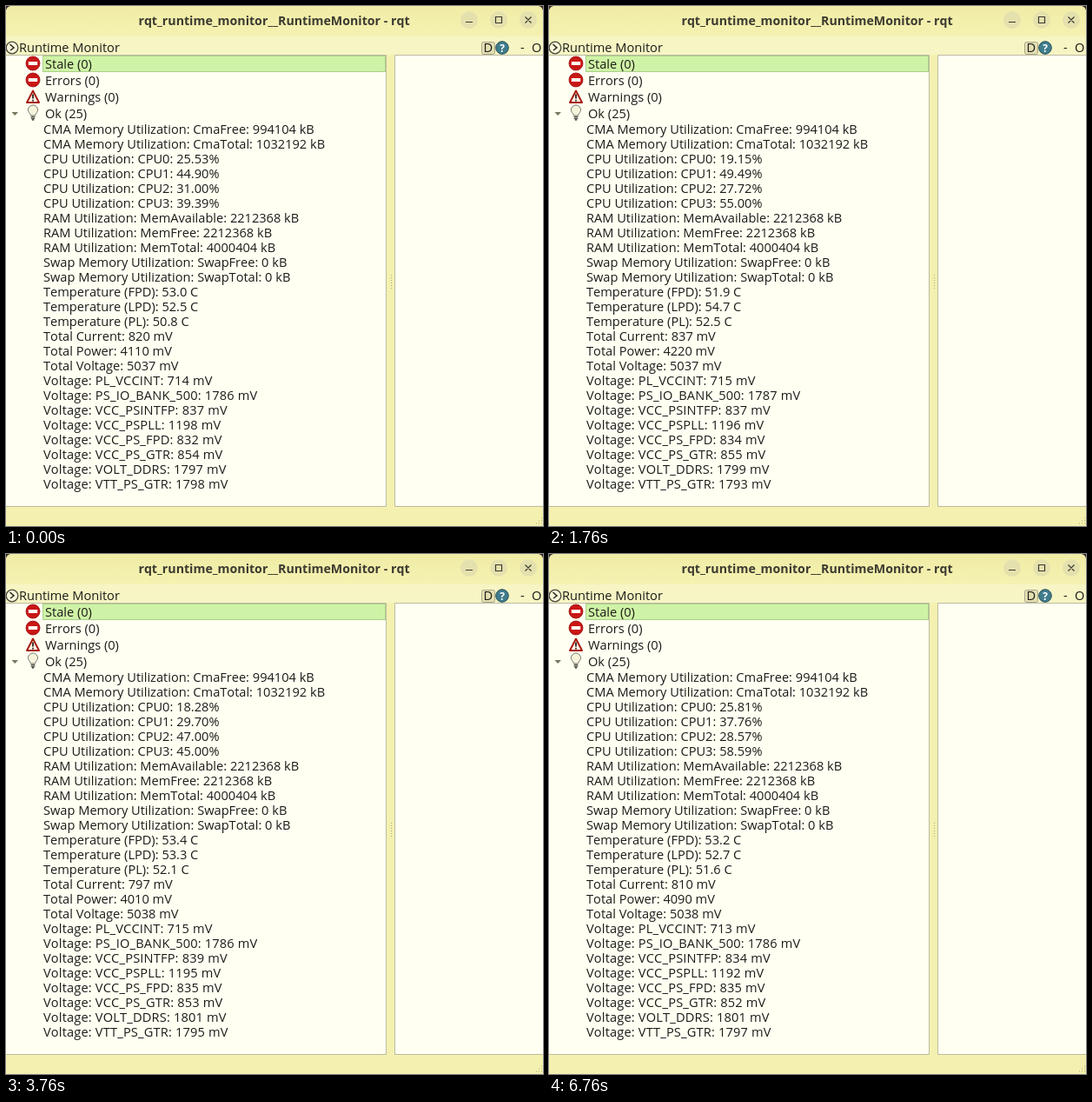
Animation of 618x598 px, one loop 8 s. Source, as an HTML page:

```html
<!DOCTYPE html>
<html lang="en">
<head>
<meta charset="utf-8">
<title>Runtime Monitor</title>
<style>
html, body { margin: 0; width: 618px; height: 598px; overflow: hidden; background: #f4f1b0; }
svg { display: block; }
text { font: 14.6px "Open Sans", "Noto Sans", sans-serif; font-kerning: none; fill: #1c1c18; white-space: pre; }
.title { font-weight: 700; font-size: 14.2px; fill: #3b3a30; text-anchor: middle; }
.volt { letter-spacing: .17px; }
</style>
</head>
<body>
<svg width="618" height="598" viewBox="0 0 618 598">
  <defs>
    <linearGradient id="bar" x1="0" y1="0" x2="0" y2="1">
      <stop offset="0" stop-color="#f0eca6"/>
      <stop offset="1" stop-color="#f5f2b2"/>
    </linearGradient>
    <g id="stop">
      <circle r="8" fill="#c91616" stroke="#9c0d0d" stroke-width=".8"/>
      <rect x="-5.2" y="-2" width="10.4" height="4" rx=".6" fill="#fffdf2"/>
    </g>
  </defs>

  <rect width="618" height="598" fill="#f4f1b0"/>
  <rect width="618" height="35" fill="url(#bar)"/>
  <rect y="35" width="618" height="21" fill="#f7f5c4"/>
  <path d="M0 0H5Q1 1 0 5ZM618 0H613Q617 1 618 5Z" fill="#3a2a2a"/>
  <text class="title" x="308.5" y="22">rqt_runtime_monitor__RuntimeMonitor - rqt</text>

  <g fill="#e5e1ae">
    <circle cx="533" cy="16" r="10"/>
    <circle cx="567" cy="16" r="10"/>
    <circle cx="601" cy="16" r="10"/>
  </g>
  <path d="M529 18.5H537M563.5 12.5H570.5V19.5H563.5ZM597.5 12.5L604.5 19.5M604.5 12.5L597.5 19.5" fill="none" stroke="#3b3a30" stroke-width="1.2"/>

  <circle cx="7" cy="48" r="6.8" fill="#fbf8dc" stroke="#4b4a3c" stroke-width="1.3"/>
  <path d="M4.5 44L9 48L5 51" fill="none" stroke="#26251c" stroke-width="1.5"/>
  <text x="15" y="53">Runtime Monitor</text>
  <rect x="547.5" y="41.5" width="15" height="14" rx="2" fill="#e3dfb2" stroke="#a9a68a"/>
  <text x="549.5" y="53">D</text>
  <circle cx="571" cy="48" r="7.3" fill="#3f7c8c" stroke="#28505c"/>
  <text x="571" y="52.5" text-anchor="middle" style="font-size:12px;font-weight:700;fill:#fff">?</text>
  <text x="592" y="53">-</text>
  <text x="605" y="53">O</text>

  <path d="M-.5 56.5H437.5V575.5H-.5ZM447.5 56.5H619V575.5H447.5Z" fill="#fffff2" stroke="#bcbba0"/>
  <path d="M443.5 309V326" stroke="#a9a78a" stroke-dasharray="1 2"/>
  <rect x="42.5" y="57.5" width="394" height="18" fill="#cff3a6" stroke="#a9cf8c"/>

  <use href="#stop" x="31" y="66"/>
  <use href="#stop" x="31" y="85"/>
  <path d="M31 97.5L38 111H24Z" fill="#fffbe8" stroke="#a81c14" stroke-width="2" stroke-linejoin="round"/>
  <path d="M31 101.5V106.5M31 107.8V109.6" stroke="#221512" stroke-width="1.7"/>
  <path d="M6.5 122H14L10.2 126Z" fill="#77765f"/>
  <path d="M28.5 126Q28 124 26.5 122.5A5.4 5.4 0 1 1 35.5 122.5Q34 124 33.5 126Z" fill="#f6f5dc" stroke="#77766a"/>
  <path d="M28.6 127.5H33.4M28.8 129.5H33.2M30 131H32" stroke="#55544c" stroke-width="1.3"/>

  <g id="rows"></g>
  <path d="M616 589h1M613 592h1m2 0h1M610 595h1m2 0h1m2 0h1" stroke="#a9a67c" stroke-width="1.2"/>
</svg>
<script>
const LOOP = 8000;
const rows = document.getElementById('rows');

// Each reading: start time, then the values of the changing rows from top to bottom.
const readings = [
  [0, 25.53, 44.90, 31.00, 39.39, 53.0, 52.5, 50.8, 820, 4110, 5037, 714, 1786, 837, 1198, 832, 854, 1797, 1798],
  [1360, 19.15, 49.49, 27.72, 55.00, 51.9, 54.7, 52.5, 837, 4220, 5037, 715, 1787, 837, 1196, 834, 855, 1799, 1793],
  [3040, 18.28, 29.70, 47.00, 45.00, 53.4, 53.3, 52.1, 797, 4010, 5038, 715, 1786, 839, 1195, 835, 853, 1801, 1795],
  [4840, 22.34, 28.28, 53.47, 39.60, 53.2, 52.8, 52.4, 812, 4090, 5037, 712, 1786, 839, 1197, 836, 853, 1797, 1798],
  [6760, 25.81, 37.76, 28.57, 58.59, 53.2, 52.7, 51.6, 810, 4090, 5038, 713, 1786, 834, 1192, 835, 852, 1801, 1797]
];

const percent = v => v.toFixed(2) + '%';
const celsius = v => v.toFixed(1) + ' C';
const milli = v => v + ' mV';

function addText(x, y, content, cls) {
  const el = document.createElementNS('http://www.w3.org/2000/svg', 'text');
  el.setAttribute('x', x);
  el.setAttribute('y', y);
  if (cls) el.setAttribute('class', cls);
  el.textContent = content;
  return rows.appendChild(el);
}

['Stale (0)', 'Errors (0)', 'Warnings (0)', 'Ok (25)']
  .forEach((s, i) => addText(45, 72 + 19 * i, s));

const list = [
  ['CMA Memory Utilization: CmaFree: 994104 kB'],
  ['CMA Memory Utilization: CmaTotal: 1032192 kB'],
  ...[0, 1, 2, 3].map(n => [`CPU Utilization: CPU${n}: `, percent]),
  ['RAM Utilization: MemAvailable: 2212368 kB'],
  ['RAM Utilization: MemFree: 2212368 kB'],
  ['RAM Utilization: MemTotal: 4000404 kB'],
  ['Swap Memory Utilization: SwapFree: 0 kB'],
  ['Swap Memory Utilization: SwapTotal: 0 kB'],
  ...['FPD', 'LPD', 'PL'].map(s => [`Temperature (${s}): `, celsius]),
  ...['Current', 'Power', 'Voltage'].map(s => [`Total ${s}: `, milli]),
  ...['PL_VCCINT', 'PS_IO_BANK_500', 'VCC_PSINTFP', 'VCC_PSPLL', 'VCC_PS_FPD',
    'VCC_PS_GTR', 'VOLT_DDRS', 'VTT_PS_GTR'].map(s => [`Voltage: ${s}: `, milli])
];

const live = [];
list.forEach(([label, format], i) => {
  const el = addText(43, 147 + 17 * i, label, label.startsWith('Voltage') ? 'volt' : '');
  if (format) live.push({ el, label, format });
});

let shown;
function draw(t) {
  const current = readings.findLast(r => r[0] <= t);
  if (current === shown) return;
  shown = current;
  live.forEach((row, i) => {
    row.el.textContent = row.label + row.format(current[i + 1]);
  });
}

const start = performance.now();
function tick() {
  draw((performance.now() - start) % LOOP);
  requestAnimationFrame(tick);
}
draw(0);
requestAnimationFrame(tick);
</script>
</body>
</html>
```
